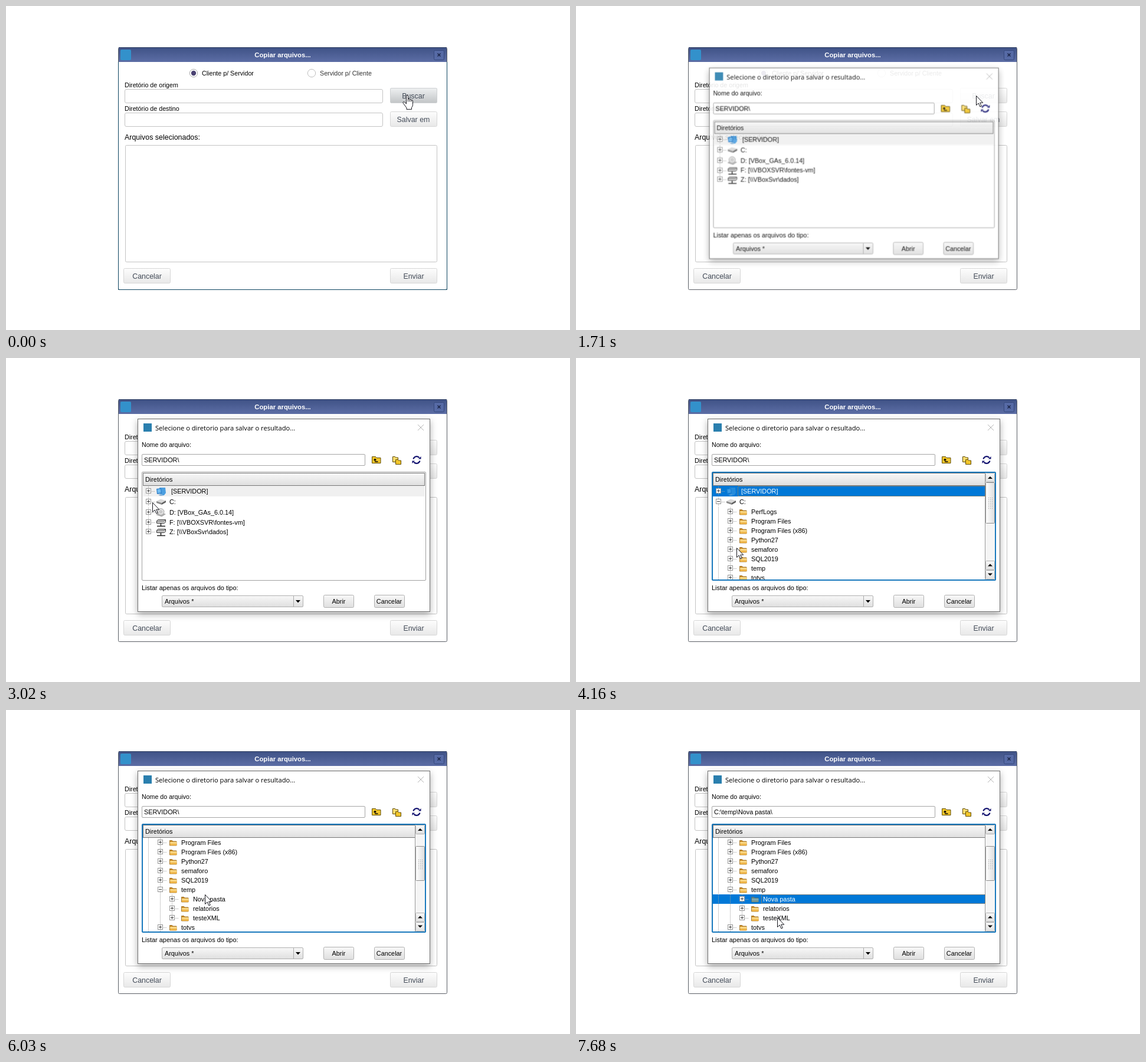
Animation, 956 px wide and 550 px high, one loop 8 s. Source, as an HTML page:

```html
<!DOCTYPE html>
<html lang="pt-BR">
<head>
<meta charset="utf-8">
<title>Copiar arquivos</title>
<style>
html, body { margin: 0; width: 100%; height: 100%; overflow: hidden; background: #fff; }
svg { display: block; }
text { font: 10.85px "Liberation Sans", Arial, sans-serif; fill: #000; white-space: pre; }
.form text { font-size: 10.7px; }
.form .btn text { font-size: 12.4px; fill: #434b58; }
.form .head { font-size: 12.45px; }
.form .title { font-size: 11.3px; font-weight: bold; fill: #fff; }
.caption { font: 11.14px "Open Sans", "Noto Sans", sans-serif; }
.mid text, text.mid { text-anchor: middle; }
.box { fill: #fff; stroke: #c3c3c3; }
.btn rect { fill: url(#soft); stroke: #d6d6d6; }
.small rect { fill: url(#face); stroke: #b0b0b0; }
.dots { fill: none; stroke: #a0a0a0; stroke-dasharray: 1 1; }
.plus { fill: #fff; stroke: #979797; }
.sign { stroke: #444; }
.crisp, .dots, .plus, .sign { shape-rendering: crispEdges; }
.sel text { fill: #fff; }
.sel use { opacity: .5; }
.sel .focus { fill: none; stroke: #e58a2c; stroke-dasharray: 1 1; }

/* Every part shares one 8 s clock. */
.t { animation: 8s step-end infinite; }
.active { animation-name: active; }
.press { animation-name: press; }
.hand { animation-name: hand; }
.arrow { animation-name: arrow; }
.focused { animation-name: focused; }
.shut { animation-name: shut; }
.open { animation-name: open; }
.temp-shut { animation-name: temp-shut; }
.temp-open { animation-name: temp-open; }
.scroll { animation-name: scroll; }
.thumb { animation-name: thumb; }
.picked { animation-name: picked; }
.unpicked { animation-name: unpicked; }
.dialog { animation-name: dialog; transform-origin: 471px 267px; }
.pointer { animation-name: pointer; }

@keyframes active { 0% { opacity: 1 } 19.625%, to { opacity: 0 } }
@keyframes press { 0% { opacity: 0 } 15.25% { opacity: 1 } 16.5%, to { opacity: 0 } }
@keyframes hand { 0% { opacity: 1 } 17.625%, to { opacity: 0 } }
@keyframes arrow { 0% { opacity: 0 } 17.625%, to { opacity: 1 } }
@keyframes dialog {
  0% { opacity: 0; transform: scale(.93) }
  19.625% { opacity: .3; transform: scale(.945) }
  20.5% { opacity: .68; transform: scale(.975) }
  21.375% { opacity: .9; transform: scale(.99) }
  22.25% { opacity: .98; transform: scale(.997) }
  23%, to { opacity: 1; transform: none }
}
@keyframes focused { 0% { opacity: 0 } 43.25%, to { opacity: 1 } }
@keyframes shut { 0% { opacity: 1 } 44.375%, to { opacity: 0 } }
@keyframes open { 0% { opacity: 0 } 44.375%, to { opacity: 1 } }
@keyframes temp-shut { 0% { opacity: 1 } 68.125%, to { opacity: 0 } }
@keyframes temp-open { 0% { opacity: 0 } 68.125%, to { opacity: 1 } }
@keyframes scroll { 0% { transform: none } 72.75%, to { transform: translateY(-52px) } }
@keyframes thumb { 0% { transform: none } 72.75%, to { transform: translateY(20px) } }
@keyframes picked { 0% { opacity: 0 } 88%, to { opacity: 1 } }
@keyframes unpicked { 0% { opacity: 1 } 88%, to { opacity: 0 } }
@keyframes pointer {
  0% { transform: translate(678px, 152px) }
  27.375% { transform: translate(678px, 152px); animation-timing-function: steps(3, start) }
  30.125% { transform: translate(560px, 110px); animation-timing-function: steps(4, start) }
  33.9% { transform: translate(380px, 165px); animation-timing-function: steps(4, start) }
  37.7% { transform: translate(252px, 242px) }
  37.75% { transform: translate(248px, 245px) }
  39% { transform: translate(239px, 244px) }
  39.75% { transform: translate(240px, 242px) }
  50.125% { transform: translate(240px, 242px); animation-timing-function: steps(3, start) }
  52.9375% { transform: translate(272px, 322px) }
  53.625% { transform: translate(272px, 322px); animation-timing-function: steps(3, start) }
  56.4375% { transform: translate(307px, 368px); animation-timing-function: steps(4, start) }
  60.1875% { transform: translate(300px, 356px) }
  61.5% { transform: translate(300px, 356px); animation-timing-function: steps(4, start) }
  65.25% { transform: translate(247px, 350px); animation-timing-function: steps(3, start) }
  68.0625% { transform: translate(260px, 354px) }
  70.75% { transform: translate(260px, 354px); animation-timing-function: steps(6, start) }
  76.3% { transform: translate(337px, 313px) }
  76.5% { transform: translate(337px, 311px) }
  77.875% { transform: translate(337px, 309px) }
  81.5% { transform: translate(338px, 315px) }
  82.5% { transform: translate(340px, 322px) }
  94.25% { transform: translate(340px, 322px); animation-timing-function: steps(3, start) }
  96.875%, to { transform: translate(341px, 352px) }
}
</style>
</head>
<body>
<svg width="956" height="550" viewBox="0 0 956 550">
  <defs>
    <linearGradient id="bar" x2="0" y2="1"><stop stop-color="#405387"/><stop offset="1" stop-color="#5c6da5"/></linearGradient>
    <linearGradient id="soft" x2="0" y2="1"><stop stop-color="#fdfdfd"/><stop offset="1" stop-color="#e8e8e8"/></linearGradient>
    <linearGradient id="hover" x2="0" y2="1"><stop stop-color="#eef0f1"/><stop offset="1" stop-color="#c2c5c7"/></linearGradient>
    <linearGradient id="face" x2="0" y2="1"><stop stop-color="#f8f8f8"/><stop offset="1" stop-color="#dfdfdf"/></linearGradient>
    <linearGradient id="side"><stop stop-color="#fff"/><stop offset="1" stop-color="#dedede"/></linearGradient>
    <linearGradient id="gold" x2="0" y2="1"><stop stop-color="#ffe7a0"/><stop offset="1" stop-color="#e9a52d"/></linearGradient>
    <pattern id="grip" width="3" height="3" patternUnits="userSpaceOnUse"><path d="M0 0h1v1h-1z" fill="#999"/></pattern>
    <clipPath id="view"><path d="M232 217h462v159h-462z"/></clipPath>

    <g id="folder">
      <path d="M.5 2.5h4l1.5 1.5h6v7h-11.500z" fill="#c98a22" stroke="#96691f" stroke-width=".8"/>
      <path d="M1 5h11.500v6h-11.500z" fill="url(#gold)"/>
    </g>
    <g id="server">
      <path d="M5 1l10 0 1 9-3 4-6 1z" fill="#4c9fe0"/>
      <path d="M0 3l8-1 1 9-8 1z" fill="#2f7fc9"/>
      <path d="M1.500 4l5.500-.6.6 6-5.600.8z" fill="#72bdf2"/>
      <path d="M3 13l6-1 2 2-5 1z" fill="#8fb4d4"/>
    </g>
    <g id="disk">
      <path d="M0 6l7-3.500 9 2.500-7 4z" fill="#d8d8d8"/>
      <path d="M0 6l9 3v3l-9-3z" fill="#8a8a8a"/>
      <path d="M9 9l7-4v3l-7 4z" fill="#5f5f5f"/>
    </g>
    <g id="disc">
      <path d="M0 10l8-3 8 3-7 4.500-9-3z" fill="#aaa"/>
      <circle cx="7.500" cy="6" r="5.500" fill="#dedede" stroke="#aaa"/>
      <circle cx="7.500" cy="6" r="1.500" fill="#fff" stroke="#999"/>
    </g>
    <g id="net">
      <path d="M2.500 2.500h13v4l-2 2h-13v-4z" fill="#d5d5d5" stroke="#333"/>
      <path d="M1 5h12l2-2" fill="none" stroke="#555"/>
      <path d="M7.500 9v4M1 13.500h14" stroke="#222" stroke-width="1.600"/>
    </g>
  </defs>

  <g class="form">
    <rect x="190.500" y="70.500" width="557" height="411" rx="2" fill="#fff" stroke="#5b5f66"/>
    <path class="t active" d="M190.500 95V481.500H747.500V95" fill="none" stroke="#0d4560"/>
    <path d="M191 95V72q0-1 1-1H746q1 0 1 1V95z" fill="url(#bar)"/>
    <path class="crisp" d="M191 70.500H747" stroke="#29395c"/>
    <rect x="194" y="74" width="18" height="18" rx="2" fill="#3391cb"/>
    <text class="title mid" x="469" y="87">Copiar arquivos...</text>
    <rect x="725.500" y="75.500" width="17" height="16" rx="2" fill="#566aa5" stroke="#35487c"/>
    <path d="M731.500 80.500l5 5m0-5l-5 5" stroke="#1b2547" stroke-width="1.500"/>

    <g fill="#fff" stroke="#a9a9a9"><circle cx="318" cy="114" r="6.700"/><circle cx="518" cy="114" r="6.700" stroke="#bdbdbd"/></g>
    <circle cx="318" cy="114" r="4.200" fill="#4a4272"/>
    <text x="332" y="118">Cliente p/ Servidor</text>
    <text x="532" y="118" style="fill:#333">Servidor p/ Cliente</text>
    <text x="201" y="138">Diretório de origem</text>
    <text x="201" y="178">Diretório de destino</text>
    <text class="head" x="201" y="227">Arquivos selecionados:</text>
    <g class="box">
      <rect x="201.500" y="141.500" width="437" height="23" rx="2.500"/>
      <rect x="201.500" y="181.500" width="437" height="23" rx="2.500"/>
      <rect x="202.500" y="236.500" width="528" height="198" rx="2"/>
    </g>
    <g class="btn mid">
      <rect x="651.500" y="139.500" width="79" height="25" rx="2"/>
      <rect class="t active" x="651.500" y="139.500" width="79" height="25" rx="2" style="fill:url(#hover);stroke:#cdd0d2"/>
      <rect class="t press" x="651.500" y="139.500" width="79" height="25" rx="2" style="fill:#c0c3c6;stroke:#b4b7ba"/>
      <text x="690.500" y="157">Buscar</text>
      <rect x="651.500" y="179.500" width="79" height="25" rx="2"/><text x="690.500" y="197">Salvar em</text>
      <rect x="199.500" y="445.500" width="79" height="25" rx="2"/><text x="239" y="463">Cancelar</text>
      <rect x="651.500" y="445.500" width="79" height="25" rx="2"/><text x="691" y="463">Enviar</text>
    </g>
  </g>

  <g class="t dialog">
    <rect x="223.500" y="103.500" width="495" height="327" fill="#fff" stroke="#6e6e6e" style="filter:drop-shadow(0 4px 6px rgba(0,0,0,.32))"/>
    <rect x="233" y="111" width="14" height="14" fill="#2a7fae"/>
    <text class="caption" x="253" y="123">Selecione o diretorio para salvar o resultado...</text>
    <path d="M698 113l10 10m0-10l-10 10" stroke="#b5b5b5"/>
    <text x="230" y="151" style="font-size:10.65px">Nome do arquivo:</text>
    <rect class="box" x="230.500" y="163.500" width="378" height="19" rx="1.500" style="stroke:#a5a5a5"/>
    <text class="t unpicked" x="234" y="177">SERVIDOR\</text>
    <text class="t picked" x="234" y="177">C:\temp\Nova pasta\</text>

    <g stroke="#5d4a00" fill="#f3c62b">
      <path d="M620.500 178.500v-11h6l1.500 2h7v9z"/>
      <path d="M625.500 175.500v-4m-2 2l2-2 2 2m-2 2.500h5" fill="none" stroke="#000" stroke-width="1.300"/>
      <path d="M655.500 176.500v-9h4l1 1.500h4v7.500z" fill="#ffdf70"/>
      <path d="M660.500 180.500v-8h4l1 1.500h4v6.500z"/>
    </g>
    <g fill="none" stroke="#10106e" stroke-width="2.200">
      <path d="M690.500 171.500a5.700 5.700 0 0 1 10-2.200M701.500 174.500a5.700 5.700 0 0 1-10 2.200"/>
      <path d="M699 171.500h4.500v-4.500zM693 174.500h-4.500v4.500z" fill="#10106e" stroke="none"/>
    </g>

    <rect x="230.500" y="193.500" width="481" height="184" rx="1.500" fill="#fff" stroke="#a0a0a0"/>
    <rect class="crisp" x="232.500" y="195.500" width="477" height="21" fill="url(#face)" stroke="#777"/>
    <path d="M232 217h478v18h-478z" fill="#f0f0f0"/>
    <g id="closed" class="t shut"></g>
    <g class="t open">
      <path d="M232 217h478v159h-478z" fill="#fff"/>
      <path d="M693 195h17v181h-17z" fill="#f5f5f5"/>
      <path class="crisp" d="M693.500 195v181" stroke="#999"/>
      <g class="t temp-shut"><rect x="694.500" y="211.500" width="15" height="69" rx="1" fill="url(#side)" stroke="#8f8f8f"/><path d="M697 237h10v19h-10z" fill="url(#grip)"/></g>
      <g class="t temp-open"><g class="t thumb">
        <path d="M695 211h14v70h-14z" fill="#f5f5f5" class="t unpicked" style="animation:none;opacity:0"/>
        <rect x="694.500" y="211.500" width="15" height="58" rx="1" fill="url(#side)" stroke="#8f8f8f"/><path d="M697 232h10v18h-10z" fill="url(#grip)"/>
      </g></g>
      <g class="small"><rect x="694.500" y="195.500" width="15" height="15" rx="1"/><rect x="694.500" y="344.500" width="15" height="15" rx="1"/><rect x="694.500" y="360.500" width="15" height="15" rx="1"/></g>
      <path d="M698 205l4-4 4 4zM698 353.500l4-4 4 4zM698 365.500l4 4 4-4z"/>
    </g>
    <g clip-path="url(#view)"><g class="t scroll">
      <g id="top"></g>
      <g class="t focused"><g id="root" class="sel"></g></g>
      <g class="t open"><g id="files"></g>
        <g id="before" class="t temp-shut"></g>
        <g id="after" class="t temp-open"></g>
        <g class="t picked"><g id="chosen" class="sel"></g></g>
      </g>
    </g></g>
    <text x="236" y="210">Diretórios</text>
    <rect class="t focused" x="231" y="194" width="480" height="183" rx="1.500" fill="none" stroke="#1778bd" stroke-width="2"/>

    <text x="230" y="394" style="font-size:10.95px">Listar apenas os arquivos do tipo:</text>
    <g class="small">
      <rect x="264.500" y="403.500" width="239" height="19" rx="1.500"/><text x="269" y="417">Arquivos *</text>
      <path class="crisp" d="M487.500 404v18" stroke="#aaa"/><path d="M491 411h8l-4 4.500z"/>
      <g class="mid">
        <rect x="538.500" y="402.500" width="51" height="21" rx="2"/><text x="564" y="417">Abrir</text>
        <rect x="624.500" y="402.500" width="51" height="21" rx="2"/><text x="649.500" y="417">Cancelar</text>
      </g>
    </g>
  </g>

  <g fill="#fff" stroke="#15151c" stroke-linejoin="round">
    <path class="t hand" d="M678.500 163V153q0-1.700 1.500-1.700t1.500 1.700v5q2-1 3 .6 2-.7 2.600 1 2.400-.5 2.400 1.800v6q0 3-2 5v3h-8.500v-2.500l-5.500-7.500q-1.600-2.400.4-2.800 1.600-.1 4.600 3.400zM681.500 158v4.500m3-4v4m2.700-3v3"/>
    <g class="t pointer"><path class="t arrow" d="M.5.5v16l3.700-3.500 2.700 6 2.400-1-2.600-5.800h5z"/></g>
  </g>
</svg>
<script>
const rowX = level => 242 + 20 * level;

function row(level, y, label, icon = 'folder', open = false, last = false) {
  const x = rowX(level), m = y + .5;
  let lines = `M${x + 5} ${m}h6`;
  for (let l = 0; l <= level; l++)
    lines += `M${rowX(l) - .5} ${y - 8}v${last && l === level ? 8 : 16}`;
  const iconX = x + (icon === 'folder' ? 15 : 13);
  const textX = x + (icon === 'server' ? 38 : 35);
  return `<path class="dots" d="${lines}"/>
    <rect class="plus" x="${x - 4.5}" y="${y - 4.5}" width="8" height="8"/>
    <path class="sign" d="M${x - 3} ${y - .5}h5${open ? '' : `M${x - .5} ${y - 3}v5`}"/>
    <use href="#${icon}" x="${iconX}" y="${y - (icon === 'folder' ? 6 : 7)}"/>
    <text x="${textX}" y="${y + 4}">${label}</text>`;
}

const list = (level, y, names) => names.map((name, i) => row(level, y + 16 * i, name)).join('');

const highlight = (x, top, height) =>
  `<path d="M232 ${top}h462v${height}h-462z" fill="#0078d7"/>
   <path class="focus crisp" d="M${x}.5 ${top}.5H693.500V${top + height - .5}H${x}.5z"/>`;

const fill = (id, html) => document.getElementById(id).innerHTML = html;

const server = row(0, 226, '[SERVIDOR]', 'server');
fill('top', server);
fill('root', highlight(274, 217, 18) + server);
fill('closed', row(0, 244, 'C:', 'disk') + row(0, 262, 'D: [VBox_GAs_6.0.14]', 'disc') +
  row(0, 279, 'F: [\\\\VBOXSVR\\fontes-vm]', 'net') +
  row(0, 295, 'Z: [\\\\VBoxSvr\\dados]', 'net', false, true));
fill('files', row(0, 244, 'C:', 'disk', true) +
  list(1, 261, ['PerfLogs', 'Program Files', 'Program Files (x86)', 'Python27', 'semaforo', 'SQL2019']));
fill('before', list(1, 357, ['temp', 'totvs']));
fill('after', row(1, 357, 'temp', 'folder', true) + list(2, 373, ['Nova pasta', 'relatorios']) +
  row(2, 405, 'testeXML', 'folder', false, true) + row(1, 421, 'totvs'));
fill('chosen', highlight(314, 365, 16) + row(2, 373, 'Nova pasta'));
</script>
</body>
</html>
```
